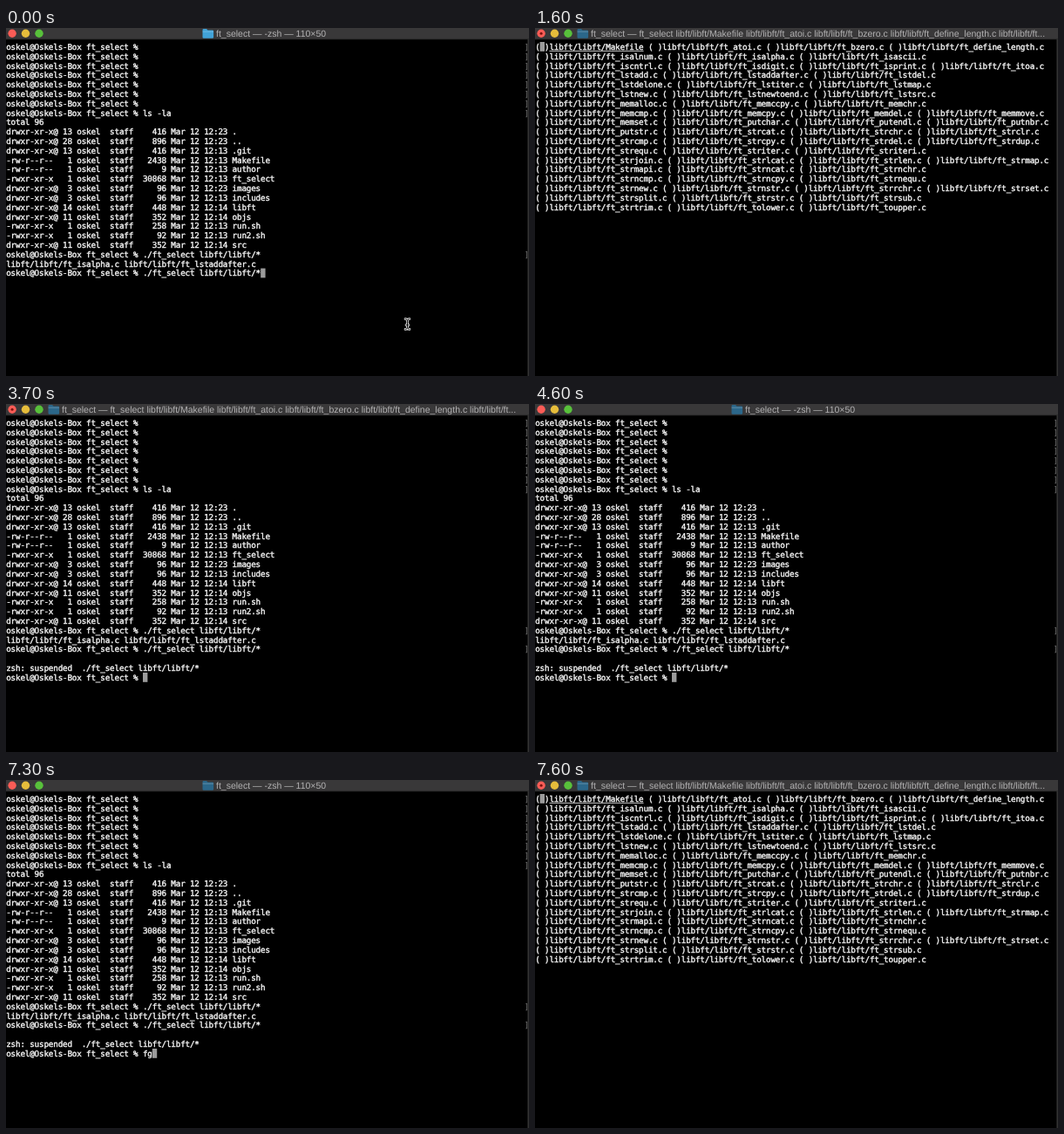
Write an HTML page that moves like this. It is 600 px wide and 399 px high and loops after 8 s.

```html
<!DOCTYPE html>
<html lang="en">
<head>
<meta charset="utf-8">
<title>ft_select</title>
<style>
  html, body { margin: 0; width: 100%; height: 100%; overflow: hidden; background: #000; }
  svg { display: block; width: 600px; height: 399px; }
  text { white-space: pre; text-rendering: geometricPrecision; }
  .term {
    font: 9.27px "DejaVu Sans Mono", monospace; letter-spacing: -0.174px;
    fill: #f4f4f4; stroke: #f4f4f4; stroke-width: 0.4px;
  }
  .term .mark { fill: #6c6c6c; stroke: none; }
  .title { font: 10.5px "Liberation Sans", sans-serif; fill: #b3b2b3; }
  .block { fill: #9b9b9b; }
</style>
</head>
<body>
<svg id="stage" viewBox="0 0 600 399">
  <rect width="600" height="399"/>
  <rect width="600" height="13" fill="#393839"/>
  <rect y="12.6" width="600" height="0.8" fill="#1c1c1c"/>
  <rect x="598.4" y="13" width="1.6" height="386" fill="#333"/>
  <circle cx="7.1" cy="6.3" r="4.7" fill="#fb5c56"/>
  <circle id="busy" cx="7.1" cy="6.3" r="1.5" fill="#7a120f"/>
  <circle cx="22.5" cy="6.3" r="4.7" fill="#e6bd3b"/>
  <circle cx="38" cy="6.3" r="4.7" fill="#58c13b"/>
  <g id="folder">
    <path d="M0 2.2Q0 1 1.2 1H4.6L6 2.4H11.4Q12.6 2.4 12.6 3.6V10.6Q12.6 11.8 11.4 11.8H1.2Q0 11.8 0 10.6Z"/>
    <path d="M0 4.2H12.6" stroke="#fff" stroke-opacity=".3" stroke-width=".8"/>
  </g>
  <text id="title" class="title" y="10"></text>
  <g id="shell" class="term"></g>
  <g id="resumed" class="term"></g>
  <g id="list" class="term"></g>
  <rect id="cursor" class="block" width="5.4" height="10.8"/>
  <g id="pointer" fill="none" stroke-linecap="round">
    <path id="beam" d="M458 333.6Q460.5 333.6 460.5 335.5V343.5Q460.5 345.4 458 345.4M463 333.6Q460.5 333.6 460.5 335.5M460.5 343.5Q460.5 345.4 463 345.4M459 340.6H462"/>
    <use href="#beam" stroke="#e8e8e8" stroke-width="2.6"/>
    <use href="#beam" stroke="#111"/>
  </g>
</svg>
<script>
const LOOP = 8000, CELL = 5.407, ROW = 10.815, LEFT = 0.2, TOP = 16, BASE = 8.9;
const COLS = 109;
const USER = "oskel";
const PROMPT = "oskel@Oskels-Box ft_select % ";
const COMMAND = "./ft_select libft/libft/*";
const $ = id => document.getElementById(id);

function svg(tag, attrs, parent, content = "") {
  const el = document.createElementNS("http://www.w3.org/2000/svg", tag);
  for (const key in attrs) el.setAttribute(key, attrs[key]);
  el.textContent = content;
  parent.append(el);
  return el;
}
const colX = col => LEFT + col * CELL;
const rowY = row => TOP + row * ROW;
const print = (parent, row, str) =>
  svg("text", { x: LEFT, y: rowY(row) + BASE }, parent, str);
const mark = (parent, row) =>
  svg("text", { class: "mark", x: 594.6, y: rowY(row) + BASE }, parent, "]");

// Shell session: mode, links, size, time, name
const files = `drwxr-xr-x@ 13 416 12:23 .
drwxr-xr-x@ 28 896 12:23 ..
drwxr-xr-x@ 13 416 12:13 .git
-rw-r--r-- 1 2438 12:13 Makefile
-rw-r--r-- 1 9 12:13 author
-rwxr-xr-x 1 30868 12:13 ft_select
drwxr-xr-x@ 3 96 12:23 images
drwxr-xr-x@ 3 96 12:13 includes
drwxr-xr-x@ 14 448 12:14 libft
drwxr-xr-x@ 11 352 12:14 objs
-rwxr-xr-x 1 258 12:13 run.sh
-rwxr-xr-x 1 92 12:13 run2.sh
drwxr-xr-x@ 11 352 12:14 src`.split("\n").map(line => {
  const [mode, links, size, time, name] = line.split(" ");
  return `${mode.padEnd(11)} ${links.padStart(2)} ${USER}  staff  ${size.padStart(5)} Mar 12 ${time} ${name}`;
});

const session = [
  ...Array(7).fill(PROMPT),
  PROMPT + "ls -la",
  "total 96",
  ...files,
  PROMPT + COMMAND,
  "libft/libft/ft_isalpha.c libft/libft/ft_lstaddafter.c",
  PROMPT + COMMAND
];
const lastRow = session.length - 1;
session.forEach((line, row) => {
  print($("shell"), row, line);
  if (line.startsWith(PROMPT) && row < lastRow) mark($("shell"), row);
});

const inputRow = lastRow + 3;
mark($("resumed"), lastRow);
print($("resumed"), lastRow + 2, "zsh: suspended  " + COMMAND);
const input = print($("resumed"), inputRow, PROMPT);

// Selection list, wrapped greedily
const sources = `atoi bzero define_length isalnum isalpha isascii iscntrl isdigit isprint itoa
lstadd lstaddafter lstdel lstdelone lstiter lstmap lstnew lstnewtoend lstsrc
memalloc memccpy memchr memcmp memcpy memdel memmove memset putchar putendl putnbr putstr
strcat strchr strclr strcmp strcpy strdel strdup strequ striter striteri strjoin strlcat strlen
strmap strmapi strncat strnchr strncmp strncpy strnequ strnew strnstr strrchr strset
strsplit strstr strsub strtrim tolower toupper`.split(/\s+/);
const paths = ["Makefile", ...sources.map(s => `ft_${s}.c`)].map(s => "libft/libft/" + s);

const rows = [""];
for (const path of paths) {
  const item = "( )" + path, line = rows[rows.length - 1];
  const joined = line ? line + " " + item : item;
  if (joined.length <= COLS) rows[rows.length - 1] = joined;
  else rows.push(item);
}
rows.forEach((line, row) => print($("list"), row, line));
svg("rect", {
  x: colX(3), y: rowY(0) + BASE + 1, width: paths[0].length * CELL, height: 0.8, stroke: "none"
}, $("list"));

const titles = {
  zsh: { text: "ft_select — -zsh — 110×50", x: 241, icon: 225.5 },
  app: { text: "ft_select — ft_select " + paths.slice(0, 4).join(" ") + " libft/libft/ft...", x: 64, icon: 48.5 }
};

// Start time, view, title, typed text
const steps = [
  [0, "start", "zsh", ""],
  [500, "list", "zsh", ""],
  [700, "list", "app", ""],
  [3700, "back", "app", ""],
  [3900, "back", "zsh", ""],
  [6200, "back", "zsh", "f"],
  [6400, "back", "zsh", "fg"],
  [7400, "list", "zsh", ""],
  [7600, "list", "app", ""]
];
const cursorAt = {
  start: () => [PROMPT.length + COMMAND.length, lastRow],
  list: () => [1, 0],
  back: typed => [PROMPT.length + typed.length, inputRow]
};
const show = (id, on) => $(id).setAttribute("visibility", on ? "visible" : "hidden");

let current = null;
function draw(time) {
  const step = steps.findLast(s => s[0] <= time);
  if (step === current) return;
  current = step;
  const [start, view, name, typed] = step;
  show("shell", view !== "list");
  show("resumed", view === "back");
  show("list", view === "list");
  show("pointer", view === "start");
  show("busy", name === "app");
  input.textContent = PROMPT + typed;

  const [col, row] = cursorAt[view](typed);
  $("cursor").setAttribute("x", colX(col));
  $("cursor").setAttribute("y", rowY(row));

  const title = titles[name];
  $("title").textContent = title.text;
  $("title").setAttribute("x", title.x);
  $("folder").setAttribute("transform", `translate(${title.icon} 0)`);
  $("folder").setAttribute("fill", start < 700 ? "#41a3d8" : "#2b678a");
}

const origin = performance.now();
function tick() {
  draw((performance.now() - origin) % LOOP);
  requestAnimationFrame(tick);
}
tick();
</script>
</body>
</html>
```
